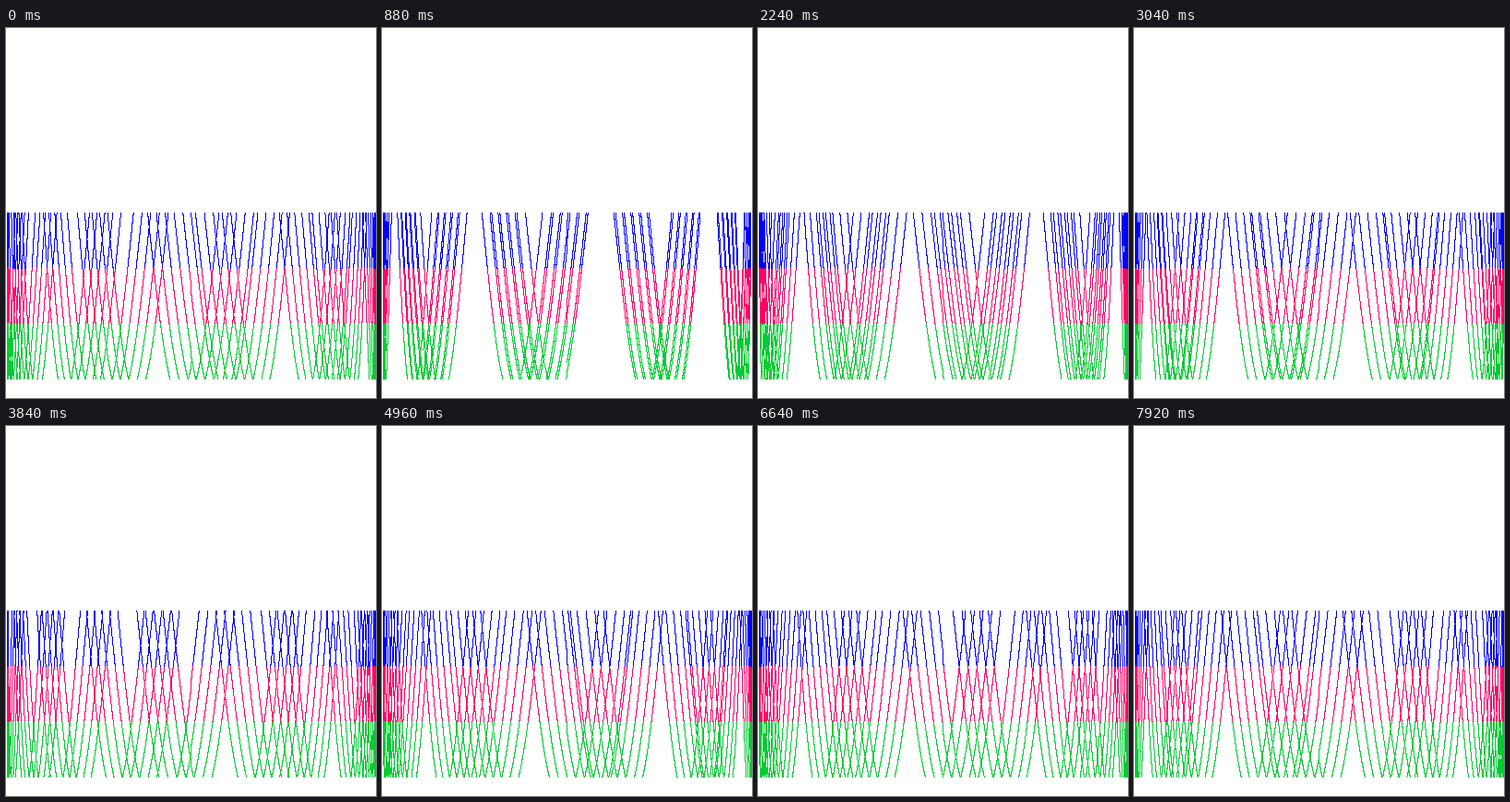
Write an HTML page with a canvas that moves like this. It is 401 px wide and 401 px high and loops after 8 s.

```html
<!DOCTYPE html>
<html lang="en">
<head>
<meta charset="utf-8">
<title>Lissajous bands</title>
<style>
  html, body { margin: 0; width: 100%; height: 100%; overflow: hidden; background: #fff; }
  canvas { display: block; width: 401px; height: 401px; image-rendering: pixelated; }
</style>
</head>
<body>
<canvas id="stage" width="401" height="401"></canvas>
<script>
const SIZE = 200;
const SIDE = 2 * SIZE + 1;
const CYCLES = 5;
const RES = 0.0002;
const FREQ = 0.6046602879796196 * 15;
const PHASE_STEP = 0.2;
const FRAME_MS = 80;
const FRAMES = 100;

const rgb = (r, g, b) => (255 << 24 | b << 16 | g << 8 | r) >>> 0;
const WHITE = rgb(255, 255, 255);
const BANDS = [rgb(0, 0, 255), rgb(255, 0, 102), rgb(0, 204, 51)];
const BAND = 0.3;
const LIMIT = BAND * BANDS.length;

const ctx = document.getElementById("stage").getContext("2d");
const image = ctx.createImageData(SIDE, SIDE);
const pixels = new Uint32Array(image.data.buffer);

// Rounds like an integer cast: toward zero after adding a half.
const toPixel = v => SIZE + Math.trunc(v * SIZE + 0.5);

// Columns never change; only the vertical phase does.
const count = Math.ceil(CYCLES * 2 * Math.PI / RES);
const columns = Int16Array.from({ length: count }, (_, i) => toPixel(Math.sin(i * RES)));

function draw(frame) {
  const phase = frame * PHASE_STEP;
  pixels.fill(WHITE);
  for (let i = 0; i < count; i++) {
    const y = Math.sin(i * RES * FREQ + phase);
    if (y < 0 || y >= LIMIT) continue;
    pixels[toPixel(y) * SIDE + columns[i]] = BANDS[Math.floor(y / BAND)];
  }
  ctx.putImageData(image, 0, 0);
}

let shown = -1;
function tick() {
  const frame = Math.floor(performance.now() / FRAME_MS) % FRAMES;
  if (frame !== shown) {
    shown = frame;
    draw(frame);
  }
  requestAnimationFrame(tick);
}
tick();
</script>
</body>
</html>
```
